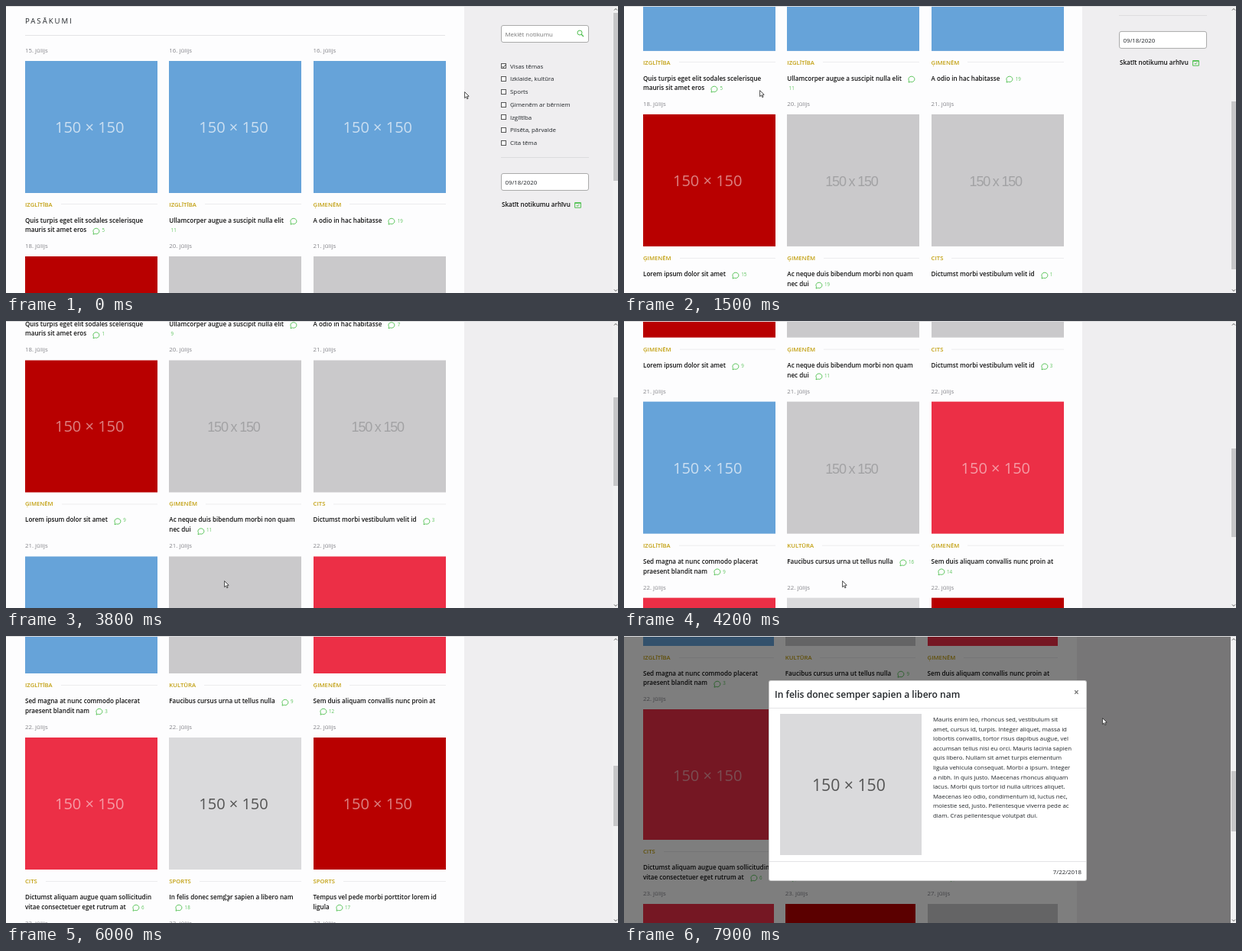
An HTML page that plays this animation: 800x376 px, repeating every 8 s.

```html
<!DOCTYPE html>
<html lang="lv">
<head>
<meta charset="utf-8">
<title>Pasākumi</title>
<style>
html, body { margin: 0; width: 100%; height: 100%; overflow: hidden; }
body { position: relative; background: #fdfdfe; color: #212529; font: 7.86px/12.6px "Open Sans", "Noto Sans", sans-serif; }
#stage, #page { position: absolute; left: 0; top: 0; width: 800px; height: 376px; }
#stage { overflow: hidden; --w: 173px; --side: 599px; }
#stage div, #stage hr { position: absolute; box-sizing: border-box; margin: 0; white-space: nowrap; }
#stage hr { border: 0; height: 1px; background: #e4e4e6; }
svg { fill: none; stroke: #4fc04f; }
.head { left: 25px; top: 13.5px; font-size: 9.6px; letter-spacing: 2px; }
.card { width: var(--w); height: var(--w);
  left: calc(25px + var(--c) * (var(--w) + 15.3px));
  top: calc(71.5px + var(--r) * (var(--w) + 83.8px)); }
.date { top: -20px; color: #85858a; }
.pic { width: 100%; height: 100%; }
.size { left: 39px; top: 73px; font-size: 20px; line-height: 27px; }
.size.alt { top: 75px; font: 18px/27px "Liberation Sans", Arial, sans-serif; letter-spacing: -1.2px; }
#stage .cat { top: calc(var(--w) + 9.2px); width: 100%; display: flex; align-items: center; gap: 11px;
  font-size: 7.7px; font-weight: 600; color: #c2a011; }
#stage .cat hr { position: static; flex: 1; background: #ececee; }
#stage .title { top: calc(var(--w) + 30.2px); width: 100%; white-space: normal; font-size: 8.1px; font-weight: 600; color: #111; }
.title svg { width: 10px; height: 10px; margin-left: 8px; vertical-align: -3.5px; }
.title span { display: inline-block; margin-left: 2.3px; font-size: 6.2px; font-weight: 400; color: #5cc45c; }
.side { left: var(--side); top: 0; width: 201px; height: 2000px; background: #efeef0; }
.box { left: 48px; width: 115px; height: 22.5px; padding: 5px 4.5px; background: #fff; border: 1px solid #aaa; border-radius: 3px; }
.check { left: 60px; }
.check::before { content: ""; position: absolute; left: -12px; top: 2.8px; width: 5px; height: 5px; border: 1px solid #555; background: #fff; }
#stage .side svg { position: absolute; }
#shade { width: 793px; height: 376px; background: #000; }
#modal { left: 188.5px; top: 57.5px; width: 416.5px; height: 263.5px; background: #fff; border: 1px solid rgba(0,0,0,.2); border-radius: 3px; }
#modal hr { width: 100%; }
#modal .pic { left: 14.5px; top: 43px; width: 185px; height: 185px; background: #dadadc; color: #555; }
#modal .size { left: 42px; top: 78px; font-size: 21.2px; line-height: 30px; }
.bar { left: 793px; width: 7px; height: 376px; background: #f1f1f2; }
#thumb { left: .5px; width: 6.5px; background: #c6c6c8; }
.bar svg { position: absolute; left: 0; top: 0; stroke: #555; }
#cursor { position: absolute; left: 0; top: 0; width: 8px; height: 11px; fill: #fff; stroke: #222; stroke-width: .8; }
</style>
</head>
<body>
<div id="stage">
  <div id="page">
    <div class="head">PASĀKUMI</div>
    <hr style="left:25px;top:38px;width:549px">
    <div class="side" id="side">
      <div class="box" style="top:25px;color:#777">Meklēt notikumu</div>
      <svg style="left:147px;top:31px" width="10" height="10"><circle cx="4" cy="4" r="3"/><path d="M6.2 6.2 9 9" stroke-width="1.3"/></svg>
      <svg style="left:48px;top:74px" width="8" height="9"><path d="M1.6 5 3 6.6 6 3.2" stroke="#222"/></svg>
      <hr style="left:48px;top:197.5px;width:115px;background:#dcdcde">
      <div class="box" style="top:219px">09/18/2020</div>
      <div style="left:49px;top:253.7px;font-weight:600;font-size:8.1px;color:#111">Skatīt notikumu arhīvu</div>
      <svg style="left:143.5px;top:256px" width="9" height="9"><path d="M.6 1.6h7.8v6.6H.6zM.6 2.4h7.8M2.8 5l1.3 1.3L6.4 4"/></svg>
    </div>
  </div>
  <div id="shade"></div>
  <div id="modal">
    <div style="left:7.5px;top:9px;font-size:12.1px;line-height:18px;font-weight:600">In felis donec semper sapien a libero nam</div>
    <div style="left:398.5px;top:7px;font-size:12px;line-height:16px;font-weight:700;color:#777">×</div>
    <hr style="top:35px">
    <div class="pic"><div class="size">150 × 150</div></div>
    <div id="text" style="left:214.5px;top:44.5px"></div>
    <hr style="top:236.5px">
    <div style="right:6px;top:244px">7/22/2018</div>
  </div>
  <div class="bar">
    <div id="thumb"></div>
    <svg width="7" height="376"><path d="M2 5.5 4 3.5 6 5.5M2 371.5l2 2 2-2"/></svg>
  </div>
  <hr style="left:0;top:0;width:800px;background:#dcdcde">
  <svg id="cursor" viewBox="0 0 8 11"><path d="M.6.6v8l1.9-1.7 1.3 2.8 1.3-.6-1.3-2.7 2.4-.2z"/></svg>
</div>
<script>
const $ = id => document.getElementById(id);
const LOOP = 8000;

// style: background, label colour, label type
const styles = {
  blue: ['#66a3d9', '#cbdff1'], dark: ['#b80000', '#dc8080'], red: ['#ec2f46', '#f59ba5'],
  pale: ['#dadadc', '#555'], gray: ['#cac9cb', '#a2a2a4', 'alt']
};
const rows = [
  ['15 blue IZGLĪTĪBA Quis turpis eget elit sodales scelerisque mauris sit amet eros',
   '16 blue IZGLĪTĪBA Ullamcorper augue a suscipit nulla elit',
   '16 blue ĢIMENĒM A odio in hac habitasse'],
  ['18 dark ĢIMENĒM Lorem ipsum dolor sit amet',
   '20 gray ĢIMENĒM Ac neque duis bibendum morbi non quam nec dui',
   '21 gray CITS Dictumst morbi vestibulum velit id'],
  ['21 blue IZGLĪTĪBA Sed magna at nunc commodo placerat praesent blandit nam',
   '21 gray KULTŪRA Faucibus cursus urna ut tellus nulla',
   '22 red ĢIMENĒM Sem duis aliquam convallis nunc proin at'],
  ['22 red CITS Dictumst aliquam augue quam sollicitudin vitae consectetuer eget rutrum at',
   '22 pale SPORTS In felis donec semper sapien a libero nam',
   '22 dark SPORTS Tempus vel pede morbi porttitor lorem id ligula'],
  ['23 red CITS Lorem ipsum', '23 dark SPORTS Lorem ipsum', '27 gray CITS Lorem ipsum']
];
// comment counts change with every load of more rows
const counts = [
  [5, 11, 19, 15, 19, 1],
  [1, 9, 7, 9, 11, 3, 9, 16, 14, 9, 3, 14],
  [4, 8, 6, 2, 13, 5, 3, 9, 12, 6, 18, 17, 7, 10, 4]
];
const loads = [2900, 5800];

const bubble = '<svg viewBox="0 0 10 10"><path d="M1 9.2 1.5 6.9A4 3.7 0 1 1 3.4 8.4Z" stroke-width=".9"/></svg>';
const cards = rows.flatMap((row, r) => row.map((entry, c) => {
  const [day, look, cat, ...words] = entry.split(' ');
  const [bg, ink, type = ''] = styles[look];
  const el = document.createElement('div');
  el.className = 'card';
  el.style.cssText = `--r:${r};--c:${c}`;
  el.innerHTML = `<div class="date">${day}. jūlijs</div>
    <div class="pic" style="background:${bg};color:${ink}"><div class="size ${type}" style="${type && 'left:50px'}">150 ${type ? 'x' : '×'} 150</div></div>
    <div class="cat">${cat}<hr></div>
    <div class="title">${words.join(' ')}${bubble}<span></span></div>`;
  $('page').append(el);
  return { el, count: el.querySelector('span') };
}));

['Visas tēmas', 'Izklaide, kultūra', 'Sports', 'Ģimenēm ar bērniem', 'Izglītība', 'Pilsēta, pārvalde', 'Cita tēma']
  .forEach((label, i) => {
    const el = document.createElement('div');
    el.className = 'check';
    el.textContent = label;
    el.style.top = 72.7 + i * 16.75 + 'px';
    $('side').prepend(el);
  });

$('text').innerHTML = `Mauris enim leo, rhoncus sed, vestibulum sit
amet, cursus id, turpis. Integer aliquet, massa id
lobortis convallis, tortor risus dapibus augue, vel
accumsan tellus nisi eu orci. Mauris lacinia sapien
quis libero. Nullam sit amet turpis elementum
ligula vehicula consequat. Morbi a ipsum. Integer
a nibh. In quis justo. Maecenas rhoncus aliquam
lacus. Morbi quis tortor id nulla ultrices aliquet.
Maecenas leo odio, condimentum id, luctus nec,
molestie sed, justo. Pellentesque viverra pede ac
diam. Cras pellentesque volutpat dui.`.replace(/\n/g, '<br>');

const clamp = x => Math.min(1, Math.max(0, x));
const smooth = x => x * x * (3 - 2 * x);

// keys: [time, value...]
function at(keys, t, ease = x => x) {
  const i = keys.findIndex(k => k[0] > t);
  if (i < 0) return keys.at(-1).slice(1);
  if (!i) return keys[0].slice(1);
  const [a, b] = [keys[i - 1], keys[i]];
  const p = ease((t - a[0]) / (b[0] - a[0]));
  return a.slice(1).map((v, j) => v + (b[j + 1] - v) * p);
}

const scrollKeys = [[1000, 0], [1100, 30], [1400, 155], [1500, 186], [1600, 195],
  [3600, 195], [3700, 225], [3800, 276], [4200, 479], [4800, 696], [4900, 709], [6400, 709], [6600, 738]];
const cursorKeys = [[100, 599, 112], [900, 177, 110], [1900, 177, 110], [2700, 285, 340],
  [5900, 285, 340], [6500, 300, 310], [7250, 300, 310], [7800, 625, 107]];
const thumbs = [[.6237, 220], [.3305, 116], [.2277, 79]];

let shown;
function draw(now) {
  const t = now % LOOP;
  const stage = loads.filter(l => t >= l).length;
  if (stage !== shown) {
    shown = stage;
    cards.forEach(({ el, count }, i) => {
      const n = counts[stage][i];
      el.hidden = n === undefined;
      count.textContent = n;
    });
  }
  const [scroll] = at(scrollKeys, t);
  const [x, y] = at(cursorKeys, t, smooth);
  const [rate, size] = thumbs[stage];
  const open = t >= 6890;
  const slide = (1 - clamp((t - 6856) / 300)) ** 2;

  $('stage').style.setProperty('--w', open ? '170.5px' : '173px');
  $('stage').style.setProperty('--side', open ? '592px' : '599px');
  $('page').style.transform = `translateY(${-scroll}px)`;
  $('thumb').style.top = 9 + scroll * rate + 'px';
  $('thumb').style.height = size + 'px';
  $('shade').style.opacity = .5 * clamp((t - 6898) / 150);
  $('modal').style.opacity = clamp((t - 6910) / 150);
  $('modal').style.transform = `translateY(${-50 * slide}px)`;
  $('cursor').style.transform = `translate(${x}px,${y}px)`;
}
const start = performance.now();
(function tick() {
  draw(performance.now() - start);
  requestAnimationFrame(tick);
})();
</script>
</body>
</html>
```
